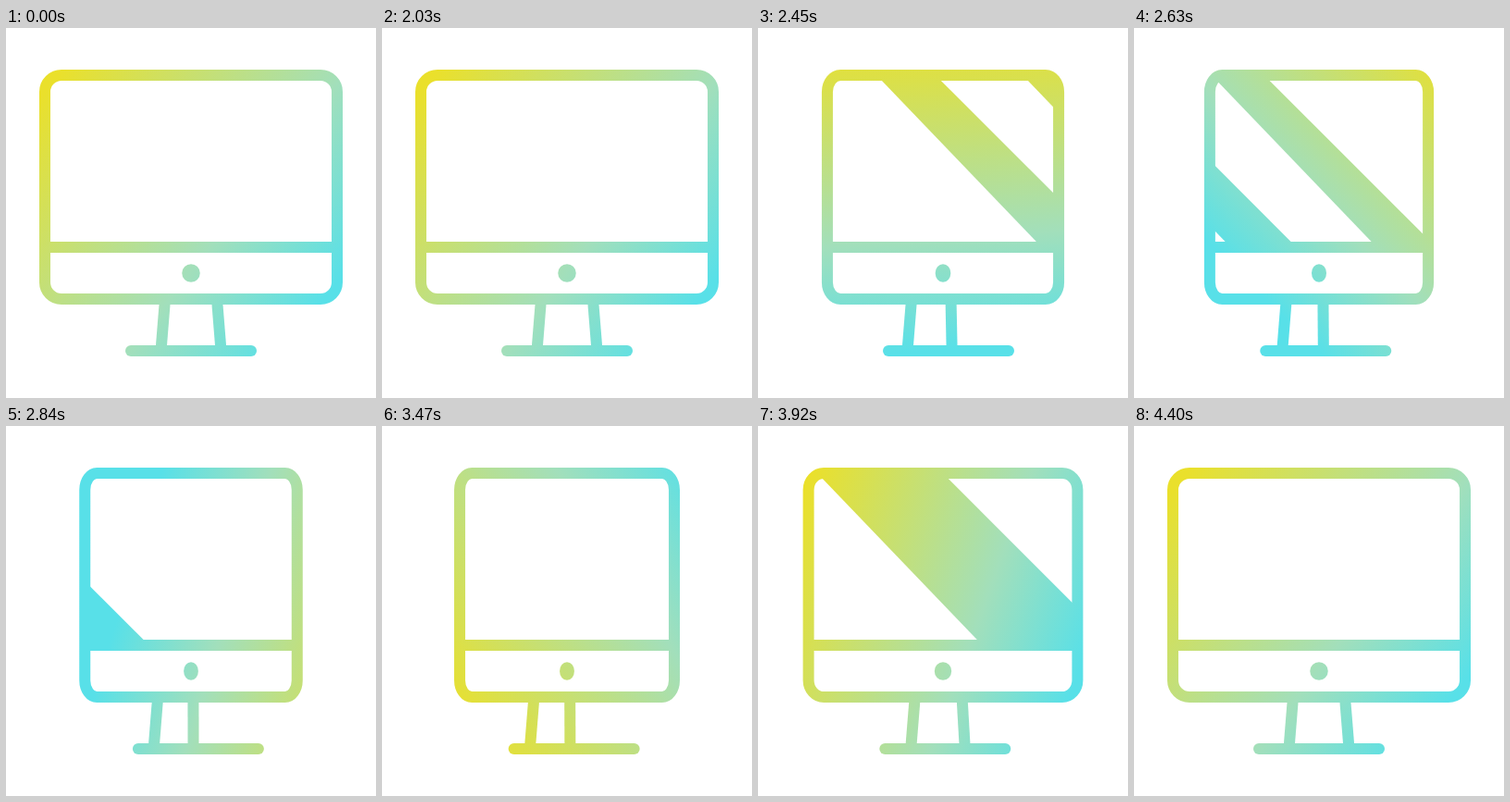
Write an HTML page with a canvas that moves like this. It is 400 by 400 pixels and loops after 4.43 s.

```html
<!DOCTYPE html>
<html lang="en">
<head>
<meta charset="utf-8">
<title>Monitor icon</title>
<style>
  html, body { margin: 0; width: 100%; height: 100%; overflow: hidden; background: #fff; }
  canvas { display: block; width: 400px; height: 400px; }
</style>
</head>
<body>
<canvas id="stage" width="400" height="400"></canvas>
<script>
const ctx = document.getElementById('stage').getContext('2d');
const LOOP = 4430, START = 2030, STEP = 30;
const MID = 200, LINE = 12;
const SCREEN_TOP = 57, SCREEN_BOTTOM = 231;

const clamp = x => Math.min(1, Math.max(0, x));
const progress = (t, start, duration) => clamp((t - start) / duration);
const easeInOut = (x, power) => x < 0.5
  ? Math.pow(2 * x, power) / 2
  : 1 - Math.pow(2 - 2 * x, power) / 2;

// Cubic bezier easing with flat ends: control points (x1, 0) and (x2, 1).
function easeBezier(x, x1, x2) {
  let lo = 0, hi = 1;
  for (let i = 0; i < 24; i++) {
    const s = (lo + hi) / 2, r = 1 - s;
    if (3 * r * r * s * x1 + 3 * r * s * s * x2 + s * s * s < x) lo = s;
    else hi = s;
  }
  return lo * lo * (3 - 2 * lo);
}

// Gradient keys: time, angle in degrees, length, position of the stage centre.
const gradientKeys = [
  [2030, 38, 376, 0.546],
  [2450, 86, 342, 0.567],
  [2840, 197, 322, 0.77],
  [3470, 327, 366, 0.45],
  [3920, 380, 345, 0.535],
  [4400, 398, 376, 0.546]
];

function keyedValue(keys, t, column) {
  const last = keys.length - 1;
  if (t <= keys[0][0]) return keys[0][column];
  if (t >= keys[last][0]) return keys[last][column];
  const i = keys.findIndex(key => key[0] > t) - 1;
  const slope = k => k === 0 || k === last ? 0
    : (keys[k + 1][column] - keys[k - 1][column]) / (keys[k + 1][0] - keys[k - 1][0]);
  const span = keys[i + 1][0] - keys[i][0];
  const u = (t - keys[i][0]) / span, u2 = u * u, u3 = u2 * u;
  return keys[i][column] * (2 * u3 - 3 * u2 + 1)
    + keys[i + 1][column] * (3 * u2 - 2 * u3)
    + span * (slope(i) * (u3 - 2 * u2 + u) + slope(i + 1) * (u3 - u2));
}

function makeGradient(t) {
  const angle = keyedValue(gradientKeys, t, 1) * Math.PI / 180;
  const length = keyedValue(gradientKeys, t, 2);
  const centre = keyedValue(gradientKeys, t, 3);
  const dx = Math.cos(angle) * length, dy = Math.sin(angle) * length;
  const gradient = ctx.createLinearGradient(
    MID - dx * centre, MID - dy * centre,
    MID + dx * (1 - centre), MID + dy * (1 - centre));
  gradient.addColorStop(0, '#eae02b');
  gradient.addColorStop(0.65, '#a2dfbb');
  gradient.addColorStop(1, '#58e0e8');
  return gradient;
}

// 0 = full width, 1 = narrowest
function squeeze(t) {
  const shrink = easeBezier(progress(t, 2030, 1000), 0.33, 0.1);
  const grow = easeInOut(progress(t, 3260, 1100), 2.5);
  return shrink - grow;
}

function line(x1, y1, x2, y2) {
  ctx.beginPath();
  ctx.moveTo(x1, y1);
  ctx.lineTo(x2, y2);
  ctx.stroke();
}

function drawFrame(half) {
  const scale = half / 158;
  ctx.save();
  ctx.translate(MID, 0);
  ctx.scale(scale, 1);
  ctx.beginPath();
  ctx.roundRect(-158, 51, 316, 242, 18);
  ctx.restore();
  ctx.stroke();
  line(MID - half, 237, MID + half, 237);
}

function drawStand(p) {
  const shift = 8 * p;
  ctx.lineCap = 'butt';
  line(172 - shift, 293, 167.5 - shift, 349);
  line(228 - 26 * p, 293, 232.5 - 30.5 * p, 349);
  ctx.lineCap = 'round';
  line(135 + shift, 349, 265 + shift, 349);
  ctx.lineCap = 'butt';
}

function drawBand(left, width) {
  ctx.beginPath();
  ctx.moveTo(left, SCREEN_TOP);
  ctx.lineTo(left + width, SCREEN_TOP);
  ctx.lineTo(left + width + 174, SCREEN_BOTTOM);
  ctx.lineTo(left + 167, SCREEN_BOTTOM);
  ctx.fill();
}

function drawGlare(t, half) {
  ctx.save();
  ctx.beginPath();
  ctx.rect(MID - half, SCREEN_TOP - 1, half * 2, SCREEN_BOTTOM - SCREEN_TOP + 2);
  ctx.clip();
  if (t > START && t < 3110) {
    const left = 365 - 685 * easeInOut(progress(t, 1990, 1120), 2);
    drawBand(left, 64);
    drawBand(left + 158, 57);
  } else if (t > 3480 && t < 4400) {
    drawBand(358 - 630 * easeInOut(progress(t, 3480, 920), 2), 136);
  }
  ctx.restore();
}

function draw(t) {
  const p = squeeze(t), half = 158 - 44 * p;
  ctx.fillStyle = '#fff';
  ctx.fillRect(0, 0, 400, 400);
  ctx.fillStyle = ctx.strokeStyle = makeGradient(t);
  ctx.lineWidth = LINE;
  drawGlare(t, half);
  drawFrame(half);
  drawStand(p);
  ctx.beginPath();
  ctx.ellipse(MID, 265, 9.75 - 1.9 * p, 9.75, 0, 0, Math.PI * 2);
  ctx.fill();
}

function tick() {
  const t = performance.now() % LOOP;
  draw(t < START ? START : START + Math.floor((t - START) / STEP) * STEP);
  requestAnimationFrame(tick);
}
tick();
</script>
</body>
</html>
```
